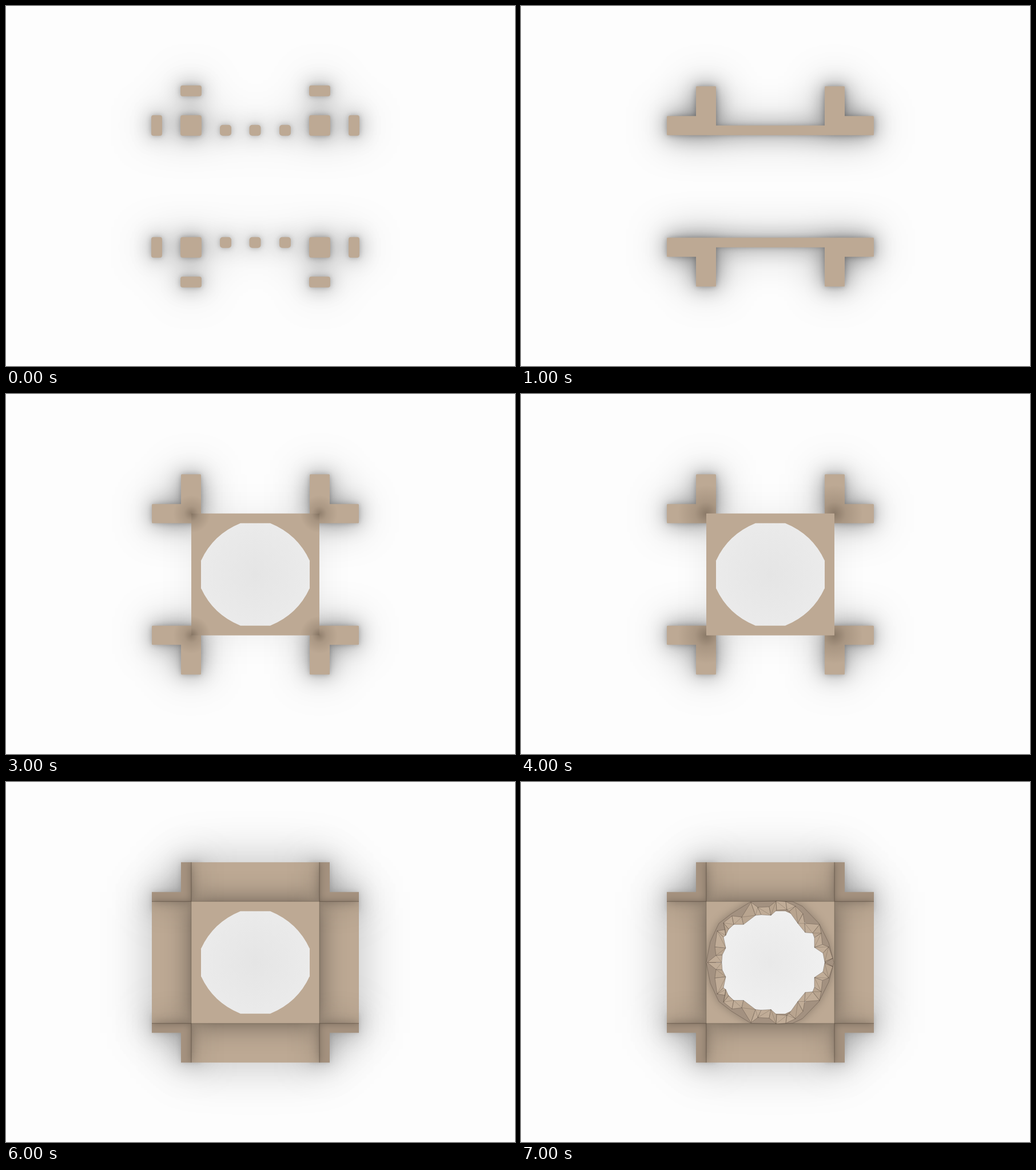
These frames come from a looping animation (890 by 629 pixels, 8000 ms). An HTML page with a canvas:

```html
<!DOCTYPE html>
<html lang="en">
<head>
<meta charset="utf-8">
<title>Building sequence</title>
<style>
  html, body { margin: 0; width: 100%; height: 100%; overflow: hidden; background: #fdfdfd; }
  canvas { display: block; }
</style>
</head>
<body>
<canvas id="stage" width="890" height="629"></canvas>
<script>
const W = 890, H = 629, CX = 436, CY = 315.25;
const WOOD = '#bda994', PAPER = '#fdfdfd';
const ctx = document.getElementById('stage').getContext('2d');

// Half extents of the plan, measured from its centre.
const OUT_X = 181, PIER_X = 130, SQ_X = 112, IN_X = 95;
const OUT_Y = 175, PIER_Y = 123, SQ_Y = 106.5, IN_Y = 89.5;

// Rectangle given by two corners, mirrored into all four quadrants.
function mirrored(path, x0, y0, x1, y1, radius = 0) {
  for (const sx of [-1, 1]) for (const sy of [-1, 1]) {
    path.roundRect(Math.min(sx * x0, sx * x1), Math.min(sy * y0, sy * y1),
      Math.abs(x1 - x0), Math.abs(y1 - y0), radius);
  }
}

function box(path, hx, hy) { path.rect(-hx, -hy, 2 * hx, 2 * hy); }

function polygon(points, path = new Path2D()) {
  points.forEach(([x, y], i) => i ? path.lineTo(x, y) : path.moveTo(x, y));
  path.closePath();
  return path;
}

const posts = new Path2D();
mirrored(posts, 94, 88.5, 131, 124.5, 4);
mirrored(posts, 163, 88.5, 182, 124.5, 4);
mirrored(posts, 94, 157.5, 131, 176.5, 4);
mirrored(posts, 42, 88.5, 62, 107.5, 5);
for (const y of [-107.5, 88.5]) posts.roundRect(-10.5, y, 20, 19, 5);

const piers = new Path2D();
mirrored(piers, IN_X, IN_Y, PIER_X, OUT_Y, 1.5);
mirrored(piers, IN_X, IN_Y, OUT_X, PIER_Y, 1.5);

const beams = new Path2D();
for (const y of [-SQ_Y, IN_Y]) beams.rect(-IN_X - 1, y, 2 * IN_X + 2, 17);

const square = new Path2D();
box(square, SQ_X, SQ_Y);

const frame = new Path2D(square);
box(frame, IN_X, IN_Y);

// Straight sides joined by flattened corner arcs.
const opening = new Path2D();
opening.moveTo(-26, -IN_Y);
opening.lineTo(26, -IN_Y);
opening.quadraticCurveTo(74, -70, IN_X, -24);
opening.lineTo(IN_X, 24);
opening.quadraticCurveTo(74, 70, 26, IN_Y);
opening.lineTo(-26, IN_Y);
opening.quadraticCurveTo(-74, 70, -IN_X, 24);
opening.lineTo(-IN_X, -24);
opening.quadraticCurveTo(-74, -70, -26, -IN_Y);
opening.closePath();

const cap = new Path2D(square);
cap.addPath(opening);

const arms = new Path2D();
box(arms, SQ_X, OUT_Y);
box(arms, OUT_X, SQ_Y);

const building = new Path2D();
box(building, PIER_X, OUT_Y);
box(building, OUT_X, PIER_Y);

const flanks = new Path2D();
mirrored(flanks, SQ_X, SQ_Y, PIER_X, OUT_Y);
mirrored(flanks, SQ_X, SQ_Y, OUT_X, PIER_Y);

// Shadow triangles along the square's sides, thinning towards their middles.
function wedges(depth) {
  const path = new Path2D();
  eachCorner((sx, sy) => {
    const x = sx * SQ_X, y = sy * SQ_Y;
    polygon([[x, y], [sx * 8, y], [x, y + sy * depth]], path);
    polygon([[x, y], [x, sy * 8], [x + sx * depth, y]], path);
  });
  return path;
}

// Upper half of the dome's first course: outer x, y then inner x, y.
const course = [
  [326, 315, 351, 315], [341, 303, 352, 302], [339, 288, 358, 290],
  [343, 260, 354, 271], [357, 258, 358, 268], [354, 246, 363, 257],
  [369, 234, 372, 249], [386, 236, 389, 249], [402, 210, 410, 233],
  [414, 219, 420, 232], [434, 218, 437, 233], [446, 208, 447, 224],
  [463, 209, 465, 223], [480, 217, 469, 226], [493, 230, 484, 247],
  [496, 247, 497, 263], [522, 249, 510, 264], [525, 264, 513, 272],
  [527, 284, 513, 289], [538, 288, 528, 299], [545, 308, 531, 314],
  [533, 315, 531, 315]
].map(([a, b, c, d]) => [[a - CX, b - CY], [c - CX, d - CY]]);

const rim = [
  [324, 315], [331, 279], [346, 247], [368, 230], [402, 209], [446, 208],
  [475, 209], [492, 217], [521, 247], [538, 281], [547, 315]
].map(([x, y]) => [x - CX, y - CY]);

const flip = ([x, y]) => [x, -y];
const rimPath = polygon([...rim, ...rim.slice(1, -1).reverse().map(flip)]);

function clipped(path, draw, rule = 'nonzero') {
  ctx.save();
  ctx.clip(path, rule);
  draw();
  ctx.restore();
}

function soft(path, blur, alpha, rule = 'nonzero') {
  ctx.save();
  ctx.filter = `blur(${blur}px)`;
  ctx.fillStyle = `rgba(0,0,0,${alpha})`;
  ctx.fill(path, rule);
  ctx.restore();
}

function line(points, alpha, width = 1) {
  ctx.beginPath();
  points.forEach(([x, y]) => ctx.lineTo(x, y));
  ctx.strokeStyle = `rgba(45,35,25,${alpha})`;
  ctx.lineWidth = width;
  ctx.stroke();
}

function fill(path, color = WOOD, rule = 'nonzero') {
  ctx.fillStyle = color;
  ctx.fill(path, rule);
}

function eachCorner(draw) {
  for (const sx of [-1, 1]) for (const sy of [-1, 1]) draw(sx, sy);
}

function cornerGlow(radius, alpha) {
  eachCorner((sx, sy) => {
    const x = sx * SQ_X, y = sy * SQ_Y;
    const g = ctx.createRadialGradient(x, y, 0, x, y, radius);
    g.addColorStop(0, `rgba(50,38,26,${alpha})`);
    g.addColorStop(0.4, `rgba(50,38,26,${alpha * 0.4})`);
    g.addColorStop(1, 'rgba(50,38,26,0)');
    ctx.fillStyle = g;
    ctx.fillRect(x - radius, y - radius, 2 * radius, 2 * radius);
  });
}

function groundShadow(path, strength = 1) {
  soft(path, 5, 0.26 * strength);
  soft(path, 17, 0.4 * strength);
  soft(path, 36, 0.4 * strength);
}

function drawPosts() {
  groundShadow(posts);
  fill(posts);
}

function drawWalls() {
  const walls = new Path2D(piers);
  walls.addPath(beams);
  groundShadow(walls);
  fill(walls);
}

function drawPiers(shadeRadius, shadeAlpha) {
  groundShadow(piers, 0.85);
  soft(square, 28, 0.07);
  fill(piers);
  clipped(piers, () => cornerGlow(shadeRadius, shadeAlpha));
}

function drawArches() {
  drawPiers(24, 0.3);
  fill(frame, WOOD, 'evenodd');
  clipped(frame, () => cornerGlow(30, 0.5), 'evenodd');
  eachCorner((sx, sy) => {
    line([[sx * SQ_X, sy * SQ_Y], [sx * IN_X, sy * IN_Y]], 0.55);
  });
  ctx.strokeStyle = 'rgba(45,35,25,.25)';
  ctx.lineWidth = 0.7;
  ctx.stroke(frame);
}

function drawOpening(inner, outer) {
  const g = ctx.createRadialGradient(0, 0, 0, 0, 0, 100);
  g.addColorStop(0, inner);
  g.addColorStop(1, outer);
  fill(opening, g);
}

function drawCap() {
  fill(square);
  drawOpening('#e5e5e5', '#ebebeb');
}

function drawPendentives() {
  drawPiers(32, 0.32);
  drawCap();
  clipped(cap, () => cornerGlow(34, 0.42), 'evenodd');
}

function drawSquare() {
  drawPiers(50, 0.36);
  drawCap();
}

function drawVaults(closed) {
  soft(building, 42, 0.26);
  groundShadow(piers, 0.45);
  fill(building);

  clipped(flanks, () => {
    ctx.fillStyle = 'rgba(40,30,20,.16)';
    ctx.fillRect(-W / 2, -H / 2, W, H);
    soft(arms, 7, 0.27);
  });

  clipped(arms, () => {
    soft(flanks, 9, 0.26);
    soft(flanks, 26, 0.3);
    if (closed) {
      soft(square, 24, 0.46);
      soft(square, 4, 0.08);
    } else {
      soft(square, 22, 0.12);
      soft(wedges(40), 9, 0.24);
      soft(wedges(16), 4, 0.22);
    }
  });

  eachCorner((sx, sy) => {
    const x = sx * SQ_X, y = sy * SQ_Y;
    line([[x, y], [x, sy * OUT_Y]], 0.4);
    line([[x, y], [sx * OUT_X, y]], 0.4);
  });

  drawCap();
  ctx.strokeStyle = 'rgba(45,35,25,.3)';
  ctx.lineWidth = 0.8;
  ctx.stroke(square);
}

function drawCourse() {
  clipped(cap, () => {
    soft(rimPath, 8, 0.28);
    fill(rimPath, '#a39180');
  }, 'evenodd');
  drawOpening('#e9e9e9', '#f0f0f0');

  for (const side of [p => p, flip]) {
    const edge = rim.map(side);
    const pairs = course.map(pair => pair.map(side));
    line(edge, 0.4, 0.7);
    pairs.slice(1).forEach(([outer, inner], i) => {
      const [lastOuter, lastInner] = pairs[i];
      fill(polygon([lastOuter, outer, inner, lastInner]), i % 3 === 1 ? '#b8a48f' : '#c0ac97');
      line([lastOuter, outer, inner, lastInner, lastOuter], 0.4, 0.7);
      line(i % 2 ? [lastOuter, inner] : [outer, lastInner], 0.3, 0.7);
    });
  }
}

const steps = [
  drawPosts,
  drawWalls,
  drawArches,
  drawPendentives,
  drawSquare,
  () => drawVaults(false),
  () => drawVaults(true),
  () => { drawVaults(true); drawCourse(); }
];

let shown = -1;
const start = performance.now();

function tick() {
  const step = Math.floor((performance.now() - start) / 1000) % steps.length;
  if (step !== shown) {
    shown = step;
    ctx.setTransform(1, 0, 0, 1, 0, 0);
    ctx.fillStyle = PAPER;
    ctx.fillRect(0, 0, W, H);
    ctx.translate(CX, CY);
    ctx.lineJoin = 'round';
    steps[step]();
  }
  requestAnimationFrame(tick);
}
tick();
</script>
</body>
</html>
```
